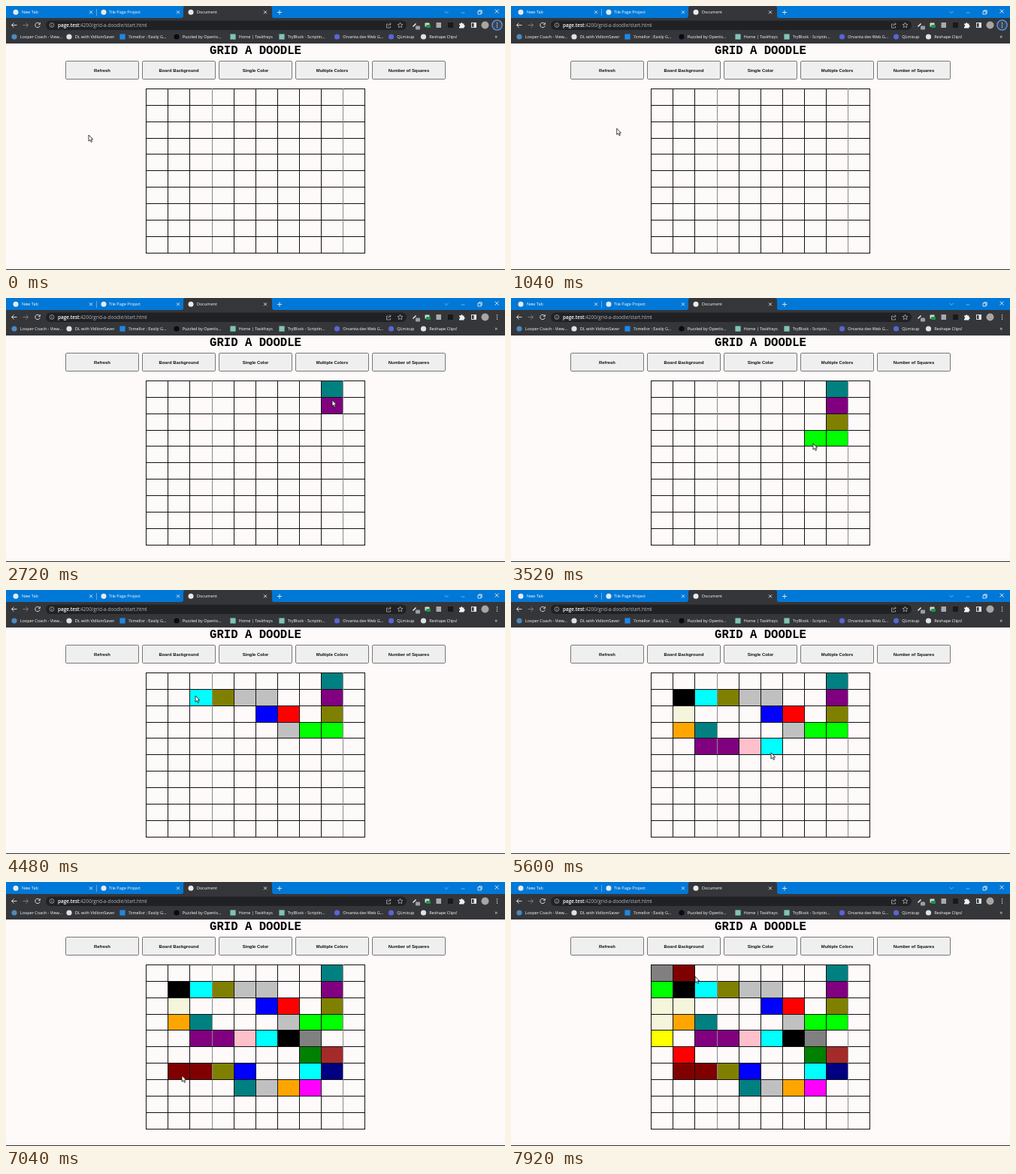
Write an HTML page that moves like this. It is 664 by 352 pixels and loops after 8000 ms.

```html
<!DOCTYPE html>
<html lang="en">
<head>
<meta charset="utf-8">
<title>Grid board</title>
<style>
  html, body { margin: 0; width: 100%; height: 100%; overflow: hidden; background: #fffafa; }
  svg { display: block; width: 664px; height: 352px; }
  .ui { font: 500 5.5px "Open Sans", "Noto Sans", sans-serif; fill: #fff; }
  .url { font-size: 6.4px; font-weight: 400; fill: #b4b8bd; }
  .host { fill: #fff; font-weight: 600; }
  .title { font: bold 15.64px "Liberation Mono", monospace; text-anchor: middle; }
  .label { font: bold 5.9px "Liberation Sans", Arial, sans-serif; text-anchor: middle; fill: #111; }
  .icon { fill: none; stroke: #e8eaed; stroke-width: .9; }
</style>
</head>
<body>
<svg viewBox="0 0 664 352">
  <rect width="664" height="352" fill="#fffafa"/>
  <rect y="351" width="664" height="1" fill="#333"/>
  <rect width="664" height="17" fill="#0078d7"/>
  <path d="M233 16q3 0 3-3V3q0-3 3-3h112q3 0 3 3v10q0 3 3 3h307v34H0V16z" fill="#35363a"/>
  <rect x="53" y="19.5" width="480" height="12.5" rx="6.2" fill="#202124"/>
  <path d="M120.5 4v9" stroke="#7ab8ea" stroke-width=".8"/>
  <g id="chrome" class="ui">
    <text class="url" x="69" y="28"><tspan class="host">page.test</tspan>:4200/grid-a-doodle/start.html</text>
    <text x="650.5" y="43" font-size="7">»</text>
  </g>
  <g class="icon">
    <path d="M583.5 7l2.5 2.5 2.5-2.5M605.5 9h5" stroke="#7ab8ea"/>
    <path d="M361 8.5h6M364 5.5v6M628 7h4v4h-4zM629.2 7V5.8h4v4H632M650.6 4.6l5 5m0-5l-5 5"/>
    <path d="M14.5 25.5h-7m3-3l-3 3 3 3"/>
    <path d="M22.5 25.5h7m-3-3l3 3-3 3" stroke="#808387"/>
    <path d="M44.6 23.6a3.2 3.2 0 1 0 .5 2.6M45.3 22v2.4h-2.4"/>
    <g stroke="#bdc1c6" stroke-width=".7">
      <circle cx="61" cy="25.5" r="2.9"/>
      <path d="M61 25v2.2M61 23.7v.6"/>
      <path d="M508.5 24h-2v5h5v-2M508.5 26.5q.5-2.5 3.5-2.5m-1.5-1.8l1.8 1.8-1.8 1.8"/>
      <path d="M524.5 22l1 2.3 2.5.2-1.9 1.7.6 2.5-2.2-1.3-2.2 1.3.6-2.5-1.9-1.7 2.5-.2z"/>
    </g>
    <path d="M541.5 27.5l4-4" stroke-width="1.6"/>
    <rect x="619.5" y="22.5" width="6" height="6"/>
    <path d="M622.5 22.5h3v6h-3z" fill="#e8eaed" stroke="none"/>
  </g>
  <rect x="545" y="26.5" width="6" height="5" rx="1" fill="#9aa0a6"/>
  <rect x="557.5" y="22.5" width="6" height="5" fill="#d8d8d8"/>
  <rect x="559" y="25" width="6" height="4" rx="1" fill="#169b45"/>
  <rect x="572.5" y="22" width="6.5" height="7" fill="#a8abad"/>
  <rect x="588" y="22" width="7" height="7" fill="#18191b"/>
  <path d="M603 23.5h2a1.2 1.2 0 0 1 2.4 0h2v2a1.2 1.2 0 0 1 0 2.4v1.6H603v-2a1.2 1.2 0 0 0 0-2.4z" fill="#f1f3f4"/>
  <circle cx="637.5" cy="25.5" r="5" fill="#a9a5a3"/>
  <circle id="ring" cx="653.5" cy="25.5" r="6.6" fill="#3c4454" stroke="#5b9cf5" stroke-width="1.3"/>
  <path d="M653.5 22.2v1.2m0 1.5v1.2m0 1.5v1.2" stroke="#f1f3f4" stroke-width="1.2"/>

  <text class="title" x="332" y="64">GRID A DOODLE</text>
  <g id="buttons"></g>
  <g id="cells"></g>
  <g id="lines"></g>
  <path id="cursor" d="M0 0v8.2l1.9-1.7 1.4 3 1.3-.7-1.3-2.9h2.4z" fill="#fff" stroke="#000" stroke-width=".75" stroke-linejoin="round"/>
</svg>
<script>
const LOOP = 8000, STEP = 80, CLICK = 2240;
const $ = id => document.getElementById(id);

function add(parent, tag, attrs, text) {
  const el = document.createElementNS(parent.namespaceURI, tag);
  for (const k in attrs) el.setAttribute(k, attrs[k]);
  if (text) el.textContent = text;
  parent.append(el);
  return el;
}

// Browser tabs: icon x, title, title x
const bar = $('chrome');
[[13, 'New Tab', 21], [130, 'Tile Page Project', 137], [246, 'Document', 254]].forEach(([cx, name, x], i) => {
  add(bar, 'circle', { cx, cy: 8.3, r: 3.5, fill: '#e8eaed' });
  add(bar, 'text', { x, y: 10.2 }, name);
  const end = 113 + 116 * i;
  add(bar, 'path', { class: 'icon', d: `M${end - 2} 6.3l4 4m0-4l-4 4` });
});

// Bookmarks: icon x, colour, round, title
[
  [11, '#4b8bbe', 1, 'Looper Coach - View...'],
  [84, '#dfe1e5', 1, 'DL with VidlomSaver'],
  [155, '#1e88e5', 0, '7zmellor : Easily G...'],
  [227, '#0a0a14', 1, 'Puzzled by Openlo...'],
  [302, '#7fc4b8', 0, 'Home | Taskfrays'],
  [367, '#7fc4b8', 0, 'TryBlock - Scriptin...'],
  [440.5, '#5865d8', 1, 'Orvanta dev Web G...'],
  [512.5, '#5865d8', 1, 'QLmixup'],
  [555.5, '#dfe1e5', 1, 'Reshape Clips!']
].forEach(([x, fill, round, name]) => {
  add(bar, 'rect', { x: x - 3.6, y: 37.4, width: 7.2, height: 7.2, rx: round ? 3.6 : 0, fill });
  add(bar, 'text', { x: x + 7.7, y: 43 }, name);
});

['Refresh', 'Board Background', 'Single Color', 'Multiple Colors', 'Number of Squares'].forEach((name, i) => {
  const x = 79.5 + 102 * i;
  add($('buttons'), 'rect', { x, y: 73.5, width: 97, height: 24, rx: 1.3, fill: '#efefef', stroke: '#767676' });
  add($('buttons'), 'text', { class: 'label', x: x + 48.5, y: 87.7 }, name);
});

// Board lines snap to whole pixels
const gridX = i => Math.floor(186.65 + 29.12 * i) + .5;
const gridY = i => Math.floor(110.45 + 21.88 * i) + .5;
for (let i = 0; i <= 10; i++) {
  const pale = i === 3 || i === 9;
  add($('lines'), 'path', { d: `M${gridX(i)} 110v220`, stroke: pale ? '#888' : '#111' });
  add($('lines'), 'path', { d: `M186 ${gridY(i)}h292`, stroke: '#111' });
}

// Strokes: start, end, last cursor position, then column-row and colour of each cell
const strokes = [
  [2320, 3520, 402, 194, '80 teal 81 purple 82 olive 83 lime 73 lime'],
  [3520, 4480, 252, 141, '63 silver 62 red 52 blue 51 silver 41 silver 31 olive 21 cyan'],
  [4480, 5600, 346, 217, '11 black 12 beige 13 orange 23 teal 24 purple 34 purple 44 pink 54 cyan'],
  [5600, 7040, 234, 258, '64 black 74 gray 75 green 85 brown 86 navy 76 cyan 77 magenta 67 orange 57 silver 47 teal 46 blue 36 olive 26 maroon 16 maroon'],
  [7040, 7920, 245, 126, '15 red 04 yellow 03 beige 02 beige 01 lime 00 gray 10 maroon']
];
const path = [[0, 110, 172], [880, 110, 172], [1760, 463, 72], [CLICK, 463, 72]];
const cells = [];
for (const [start, end, lastX, lastY, list] of strokes) {
  const items = list.match(/\d+ \w+/g), gap = (end - start) / items.length;
  items.forEach((item, i) => {
    const [spot, fill] = item.split(' '), c = +spot[0], r = +spot[1];
    const x = gridX(c), y = gridY(r), width = gridX(c + 1) - x, height = gridY(r + 1) - y;
    const el = add($('cells'), 'rect', { x, y, width, height, fill });
    cells.push({ el, at: start + (i + .5) * gap });
    const last = i === items.length - 1;
    path.push([start + (i + 1) * gap, last ? lastX : x + width / 2, last ? lastY : y + height / 2]);
  });
}

function cursorAt(t) {
  const i = path.findIndex(p => p[0] > t);
  if (i < 0) return path[path.length - 1].slice(1);
  const [t0, x0, y0] = path[i - 1], [t1, x1, y1] = path[i];
  let k = (t - t0) / (t1 - t0);
  if (i === 2) k = k * k * (3 - 2 * k);
  return [x0 + (x1 - x0) * k, y0 + (y1 - y0) * k];
}

const show = (el, on) => el.setAttribute('visibility', on ? 'visible' : 'hidden');

function draw(t) {
  const [x, y] = cursorAt(t);
  $('cursor').setAttribute('transform', `translate(${x} ${y})`);
  show($('ring'), t < CLICK);
  for (const { el, at } of cells) show(el, t >= at);
}

function tick() {
  draw(Math.floor(performance.now() % LOOP / STEP) * STEP);
  requestAnimationFrame(tick);
}
tick();
</script>
</body>
</html>
```
